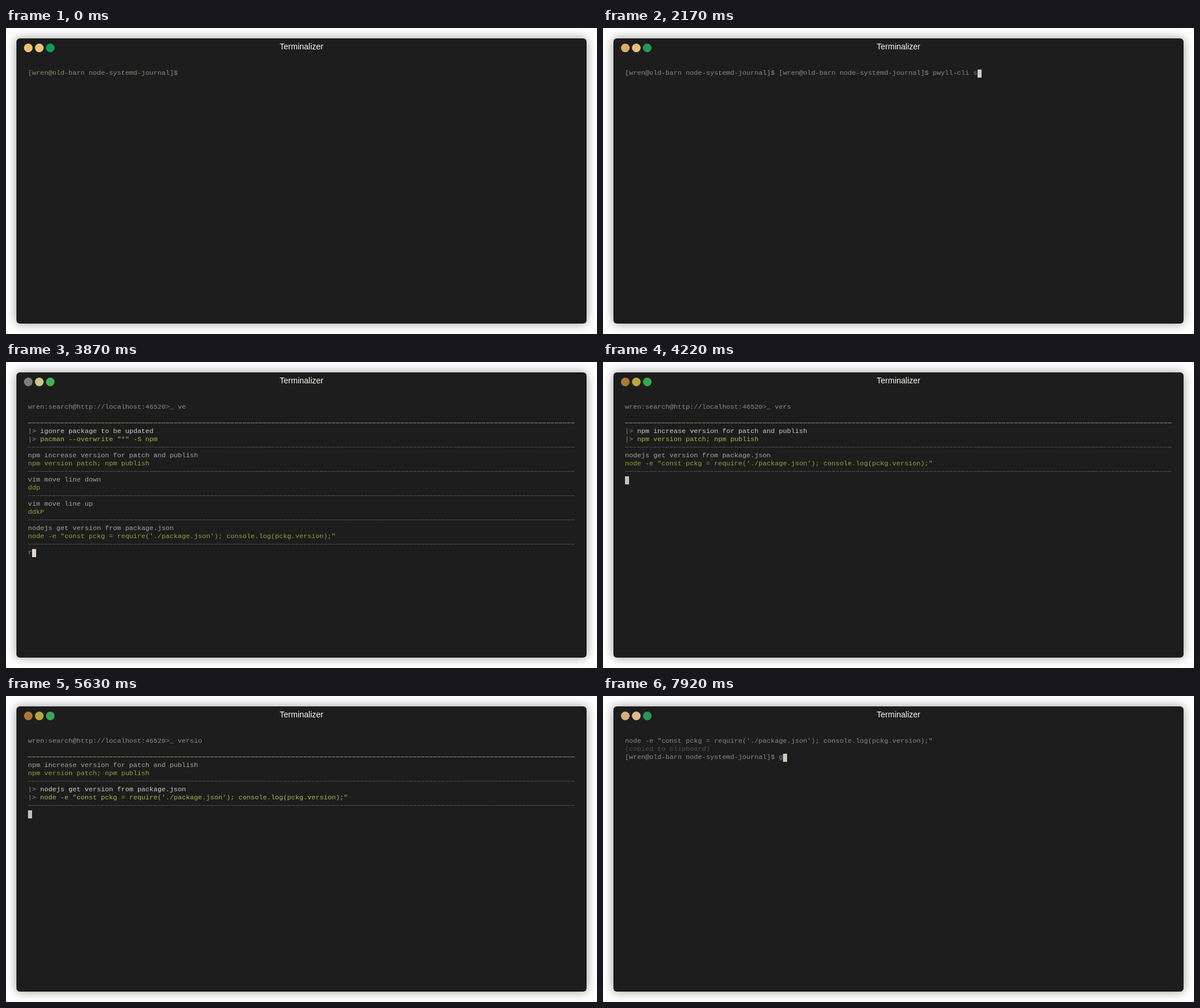
Recreate the animation shown at these times as an HTML page. Size 1021 by 530 pixels, loop 8000 ms.

```html
<!DOCTYPE html>
<html lang="en">
<head>
<meta charset="utf-8">
<title>Terminal</title>
<style>
  html, body { margin: 0; width: 100%; height: 100%; overflow: hidden; background: #fff; }
  #win {
    position: absolute; left: 18px; top: 18px; width: 985px; height: 494px;
    background: #1d1d1d; border-radius: 6px; box-shadow: 0 0 18px rgba(0, 0, 0, .4);
  }
  #title {
    position: absolute; left: 0; right: 0; top: 6px; text-align: center;
    font: 14px/16px "Liberation Sans", Arial, sans-serif; color: #f8f8ee;
  }
  .dot { position: absolute; top: 9px; width: 15px; height: 15px; border-radius: 50%; }
  #screen {
    position: absolute; left: 20px; top: 54px;
    font: 11.664px/14px "Liberation Mono", "Courier New", monospace;
    font-variant-ligatures: none; white-space: pre;
  }
  .run { position: absolute; margin-top: -1px; }
  .rule {
    position: absolute; margin-top: 5px; width: 945px; height: 1px;
    background: repeating-linear-gradient(90deg, currentColor 0 6px, transparent 6px 7px);
  }
  .cursor { position: absolute; width: 7px; height: 14px; background: currentColor; }
</style>
</head>
<body>
<div id="win">
  <div class="dot" style="left:13px"></div>
  <div class="dot" style="left:32px"></div>
  <div class="dot" style="left:51px"></div>
  <div id="title">Terminalizer</div>
  <div id="screen"></div>
</div>
<script>
const LOOP = 8000, CELL_W = 7, CELL_H = 14;
const USER = "wren", HOST = "old-barn";
const SHELL = `[${USER}@${HOST} node-systemd-journal]$ `;
const SEARCH = `${USER}:search@http://localhost:46520>_ `;

const ink = {
  plain: "#8a897f", fresh: "#7f8f72", pick: "#cfcdc0", name: "#a5a49b",
  pickCmd: "#a3b84a", cmd: "#8ba33a", rule: "#8c8c82", faintRule: "#4e4e4c", faint: "#51504c"
};

// Window buttons and block cursor per scene
const looks = {
  start:  ["#efc074", "#f0c47a", "#109d58", "#cfcdc2"],
  shell:  ["#d6ad68", "#ebbe76", "#24975a", "#cfcdc2"],
  list:   ["#a3a945", "#a3a945", "#52ae56", "#c9c9c5"],
  typing: ["#7d7d7a", "#cfc68b", "#41b255", "#ded6cb"],
  found:  ["#ad7836", "#b8a63e", "#3aa655", "#c2c2bf"],
  copied: ["#dfb985", "#dfb985", "#16915a", "#dfdacb"],
  last:   ["#d2ae7c", "#dfba88", "#29955a", "#cfcabc"]
};

const notes = {
  aslr: ["disable ASLR", 'echo "0" | sudo dd of=/proc/sys/kernel/randomize_va_space'],
  image: ["write image to disk sdcard", "dd if=source of=target bs=1M status=progress"],
  dump: ["dissasemble foobar program", "objdump -d -M intel foobar"],
  undo: ["undo git add before commit", "git reset"],
  wget: ["continue cancelled or failed download", "wget -c [url]"],
  pacman: ["igonre package to be updated", 'pacman --overwrite "*" -S npm'],
  npm: ["npm increase version for patch and publish", "npm version patch; npm publish"],
  down: ["vim move line down", "ddp"],
  up: ["vim move line up", "ddkP"],
  node: ["nodejs get version from package.json",
    `node -e "const pckg = require('./package.json'); console.log(pckg.version);"`]
};
const lists = {
  "": "aslr image dump undo wget",
  v: "aslr pacman npm down up",
  ve: "pacman npm down up node",
  ver: "pacman npm node",
  vers: "npm node", versi: "npm node", versio: "npm node"
};

const run = (row, col, text, color) => ({ kind: "run", row, col, text, color });
const rule = (row, color) => ({ kind: "rule", row, col: 0, text: "", color });

function shell(typed, color = ink.plain) {
  const text = SHELL + typed;
  return { parts: [run(0, 0, text, color)], cursor: [0, text.length] };
}

// Search view; echo is the key shown at the cursor before the list updates
function search(query, echo = "", picked = 0) {
  const parts = [run(0, 0, SEARCH + query, ink.plain), rule(2, ink.rule)];
  let row = 3;
  lists[query].split(" ").forEach((key, i) => {
    const on = i === picked, col = on ? 3 : 0, [name, cmd] = notes[key];
    if (on) parts.push(run(row, 0, "|>", ink.plain), run(row + 1, 0, "|>", ink.plain));
    parts.push(run(row, col, name, on ? ink.pick : ink.name),
      run(row + 1, col, cmd, on ? ink.pickCmd : ink.cmd),
      rule(row + 2, ink.faintRule));
    row += 3;
  });
  parts.push(run(row, 0, echo, ink.plain));
  return { parts, cursor: [row, echo.length] };
}

function result(lines, prompt = "") {
  const parts = [
    run(0, 0, notes.node[1], ink.plain),
    run(1, 0, "(copied to clipboard)", ink.faint)
  ].slice(0, lines);
  parts.push(run(lines, 0, prompt, ink.plain));
  return { parts, cursor: [lines, prompt.length] };
}

const command = typed => shell(SHELL + typed);
const steps = [
  [0, "start", { ...shell("", ink.fresh), cursor: null }],
  [100, "start", shell("", ink.fresh)],
  [300, "shell", command("")],
  [860, "shell", command("p")],
  [990, "shell", command("pw")],
  [1130, "shell", command("pwy")],
  [1320, "shell", command("pwyll-cli ")],
  [2170, "shell", command("pwyll-cli s")],
  [2350, "shell", { ...command("pwyll-cli s"), cursor: [1, 0] }],
  [2650, "list", { parts: [run(0, 0, SEARCH, ink.plain)], cursor: [2, 0] }],
  [2750, "list", search("")],
  [3430, "list", search("", "v")],
  [3450, "list", search("v")],
  [3600, "typing", search("v", "e")],
  [3700, "typing", search("ve")],
  [3870, "typing", search("ve", "r")],
  [3970, "typing", search("ver")],
  [4120, "typing", search("ver", "s")],
  [4220, "found", search("vers")],
  [4340, "found", search("vers", "i")],
  [4440, "found", search("versi")],
  [4560, "found", search("versi", "o")],
  [4660, "found", search("versio")],
  [5630, "found", search("versio", "", 1)],
  [6180, "copied", result(0)],
  [6205, "copied", result(1)],
  [6230, "copied", result(2)],
  [6730, "last", result(2, SHELL)],
  [7920, "last", result(2, SHELL + "g")]
];

const screenBox = document.getElementById("screen");
const dots = document.querySelectorAll(".dot");

function build({ kind, row, col, text, color }) {
  const el = document.createElement("div");
  el.className = kind;
  el.textContent = text;
  el.style.color = color;
  el.style.left = col * CELL_W + "px";
  el.style.top = row * CELL_H + "px";
  return el;
}

function draw([, look, { parts, cursor }]) {
  const colors = looks[look];
  dots.forEach((dot, i) => dot.style.background = colors[i]);
  screenBox.replaceChildren(...parts.map(build));
  if (cursor) {
    const [row, col] = cursor;
    screenBox.append(build({ kind: "cursor", row, col, text: "", color: colors[3] }));
  }
}

let shown = null;
const begin = performance.now();
function tick(now) {
  const t = Math.max(0, now - begin) % LOOP;
  const step = steps.findLast(s => s[0] <= t);
  if (step !== shown) draw(shown = step);
  requestAnimationFrame(tick);
}
tick(begin);
</script>
</body>
</html>
```
